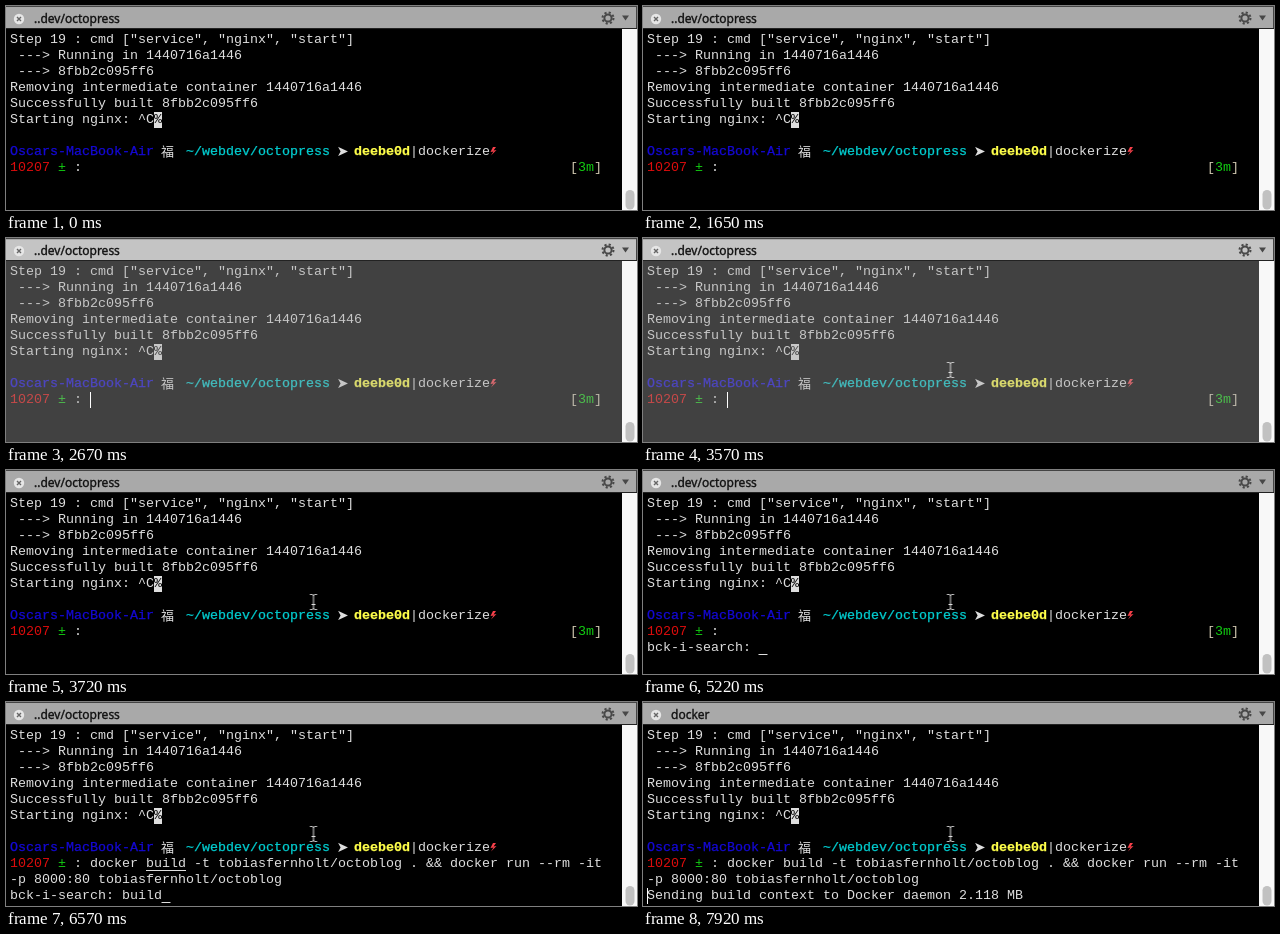
Write an HTML page that moves like this. It is 631x204 px and loops after 8000 ms.

```html
<!DOCTYPE html>
<html lang="en">
<head>
<meta charset="utf-8">
<title>Terminal history search</title>
<style>
  html, body { margin: 0; width: 100%; height: 100%; overflow: hidden; background: #000; }
  svg { display: block; width: 631px; height: 204px; }
  .term text { font: 13.333px "Liberation Mono", "Courier New", monospace; white-space: pre; fill: #dedede; }
  .title text { font: 12px "Noto Sans", "Open Sans", sans-serif; fill: #111; stroke: #111; stroke-width: .35; }
  .term .host { fill: #1408d4; stroke: #1408d4; stroke-width: .25; }
  .term .path { fill: #00cdd0; stroke: #00cdd0; stroke-width: .25; }
  .term .hash { fill: #ffff4a; font-weight: bold; stroke: #ffff4a; stroke-width: .25; }
  .term .num { fill: #dc0c0c; }
  .term .ok { fill: #12cc12; }
  .term .brk { fill: #d0c8b0; }
  .term .cjk { font: 500 13px "Noto Sans CJK SC", "Noto Sans CJK JP", "Noto Sans CJK", sans-serif; }
  .term .arrow { font: 14.5px "DejaVu Sans", sans-serif; }
  .term .inv { fill: #000; }
  .caret { fill: #fff; }
  .line { fill: #dedede; }

  /* Everything switches hard; 1% = 80 ms */
  [class*="t-"] { animation: 8s step-end infinite; }
  .t-edge { animation-name: edge; }
  .t-dim { animation-name: dim; }
  .t-caret { animation-name: caret; }
  .t-match { animation-name: match; }
  .t-run { animation-name: run; }
  .t-mouse { animation-name: mouse; }
  .t-idle { animation-name: idle; }
  .t-first { animation-name: first; }
  .t-cmd { animation-name: cmd; }
  .t-empty { animation-name: empty; }
  .t-part { animation-name: part; }
  .t-full { animation-name: full; }
  .t-prompt { animation-name: prompt; }
  .t-found { animation-name: found; }
  .t-kb { animation-name: kb; }
  .t-mb { animation-name: mb; }
  .t-send { animation-name: send; }

  @keyframes edge { 0%, 31.5%, 100% { opacity: 0 } 24.375% { opacity: 1 } }
  @keyframes dim { 0%, 46.5%, 100% { opacity: 0 } 33.375% { opacity: 1 } }
  @keyframes caret {
    0%, 20.625%, 46.5%, 65.25%, 74.625%, 100% { opacity: 0 }
    7.5%, 24.375%, 55.875%, 72.75% { opacity: 1 }
  }
  @keyframes match { 0%, 82.125%, 100% { opacity: 0 } 74.625% { opacity: 1 } }
  @keyframes run { 0% { opacity: 0 } 89.625%, 100% { opacity: 1 } }
  @keyframes mouse {
    0% { opacity: 0; transform: translate(305.5px, 123px) }
    42.75% { opacity: 1; transform: translate(305.5px, 123px) }
    44.625%, 100% { opacity: 1; transform: translate(303.5px, 124px) }
  }
  @keyframes idle { 0% { opacity: 1 } 74.625%, 100% { opacity: 0 } }
  @keyframes first { 0%, 74.625%, 100% { opacity: 0 } 72.75% { opacity: 1 } }
  @keyframes cmd { 0% { opacity: 0 } 74.625%, 100% { opacity: 1 } }
  @keyframes empty { 0%, 72.75%, 100% { opacity: 0 } 65.25% { opacity: 1 } }
  @keyframes part { 0%, 76.5%, 100% { opacity: 0 } 74.625% { opacity: 1 } }
  @keyframes full { 0%, 89.625%, 100% { opacity: 0 } 76.5% { opacity: 1 } }
  @keyframes prompt { 0% { opacity: 1 } 89.625%, 100% { opacity: 0 } }
  @keyframes found { 0%, 89.625%, 100% { opacity: 0 } 74.625% { opacity: 1 } }
  @keyframes send { 0% { opacity: 0 } 97.125%, 100% { opacity: 1 } }
  @keyframes kb { 0%, 99%, 100% { opacity: 0 } 97.125% { opacity: 1 } }
  @keyframes mb { 0% { opacity: 0 } 99%, 100% { opacity: 1 } }
</style>
</head>
<body>
<svg viewBox="0 0 631 204" xmlns="http://www.w3.org/2000/svg">
  <rect width="631" height="204"/>

  <g class="term">
    <text x="4" y="37">Step 19 : cmd ["service", "nginx", "start"]</text>
    <text x="12" y="53">---&gt; Running in 1440716a1446</text>
    <text x="12" y="69">---&gt; 8fbb2c095ff6</text>
    <text x="4" y="85">Removing intermediate container 1440716a1446</text>
    <text x="4" y="101">Successfully built 8fbb2c095ff6</text>
    <text x="4" y="117">Starting nginx: ^C</text>
    <rect class="line" x="148" y="106" width="8" height="16"/>
    <text class="inv" x="148" y="117">%</text>

    <text class="host" x="4" y="149">Oscars-MacBook-Air</text>
    <text class="cjk" x="155" y="150">福</text>
    <text class="path" x="180" y="149">~/webdev/octopress</text>
    <text class="arrow" x="330.5" y="150">➤</text>
    <text class="hash" x="348" y="149">deebe0d</text>
    <text x="404" y="149">|dockerize</text>
    <path d="M487 141l-2.500 5 3-.5-2.500 4 5.500-5.500-3 .5 2.500-3.500z" fill="#f8404a"/>

    <text class="num" x="4" y="165">10207</text>
    <text class="ok" x="52" y="165">±</text>
    <text x="68" y="165">:</text>
    <g class="t-idle">
      <text class="brk" x="564" y="165">[</text>
      <text class="ok" x="572" y="165">3m</text>
      <text class="brk" x="588" y="165">]</text>
    </g>

    <g class="t-empty">
      <text x="4" y="181">bck-i-search:</text>
      <rect class="line" x="115.5" y="184" width="9" height="1"/>
    </g>
    <g class="t-first">
      <text x="84" y="165">bundle exec rake preview</text>
      <rect class="line" x="84" y="168" width="16" height="1"/>
      <text x="4" y="181">bck-i-search: bu</text>
      <rect class="line" x="131.5" y="184" width="9" height="1"/>
    </g>

    <g class="t-cmd">
      <text x="84" y="165">docker build -t tobiasfernholt/octoblog . &amp;&amp; docker run --rm -it</text>
      <text x="4" y="181">-p 8000:80 tobiasfernholt/octoblog</text>
    </g>
    <text class="t-found" x="4" y="197">bck-i-search:</text>
    <g class="t-part">
      <rect class="line" x="140" y="168" width="24" height="1"/>
      <text x="116" y="197">bui</text>
      <rect class="line" x="139.5" y="200" width="9" height="1"/>
    </g>
    <g class="t-full">
      <rect class="line" x="140" y="168" width="40" height="1"/>
      <text x="116" y="197">build</text>
      <rect class="line" x="155.5" y="200" width="9" height="1"/>
    </g>

    <text class="t-send" x="4" y="197">Sending build context to Docker daemon</text>
    <text class="t-kb" x="316" y="197">557.1 kB</text>
    <text class="t-mb" x="316" y="197">2.118 MB</text>
  </g>

  <rect class="t-dim" y="23" width="616" height="181" fill="#a2a2a2" fill-opacity=".4"/>

  <rect class="caret t-caret" x="84" y="154" width="1" height="16"/>
  <rect class="caret t-match" x="140" y="154" width="1" height="16"/>
  <rect class="caret t-run" x="4" y="186" width="1" height="16"/>

  <g class="title">
    <rect width="631" height="23" fill="#a9a9a9"/>
    <rect class="t-dim" y="2" width="630" height="21" fill="#c4c4c4"/>
    <rect width="631" height="1" fill="#444"/>
    <rect class="t-edge" width="631" height="1" fill="#505050"/>
    <rect x="630" width="1" height="23" fill="#444"/>
    <rect y="22" width="631" height="1" fill="#222"/>
    <circle cx="13" cy="13" r="5.200" fill="#e6e6e6"/>
    <path d="M11 11l4 4m0-4l-4 4" stroke="#666" stroke-width="1.400"/>
    <text class="t-prompt" x="28" y="17">..dev/octopress</text>
    <text class="t-run" x="28" y="17">docker</text>
    <g fill="none" stroke="#484848">
      <circle cx="602" cy="12" r="3.600" stroke-width="2"/>
      <circle cx="602" cy="12" r="5.500" stroke-width="2" stroke-dasharray="2.160"/>
    </g>
    <path d="M616 9.500h7l-3.500 5z" fill="#484848"/>
  </g>

  <rect x="616" y="23" width="15" height="181" fill="#f8f8f8"/>
  <rect x="619.5" y="184" width="9" height="19.500" rx="4.500" fill="#c1c1c1"/>

  <path class="t-mouse" d="M.5.5h2q1.500 0 1.500 1.500 0-1.500 1.500-1.500h2M4 2v12M.5 15.500h2q1.500 0 1.500-1.500 0 1.500 1.500 1.500h2M2 10.500h4" fill="none" stroke="#ddd"/>
</svg>
</body>
</html>
```
